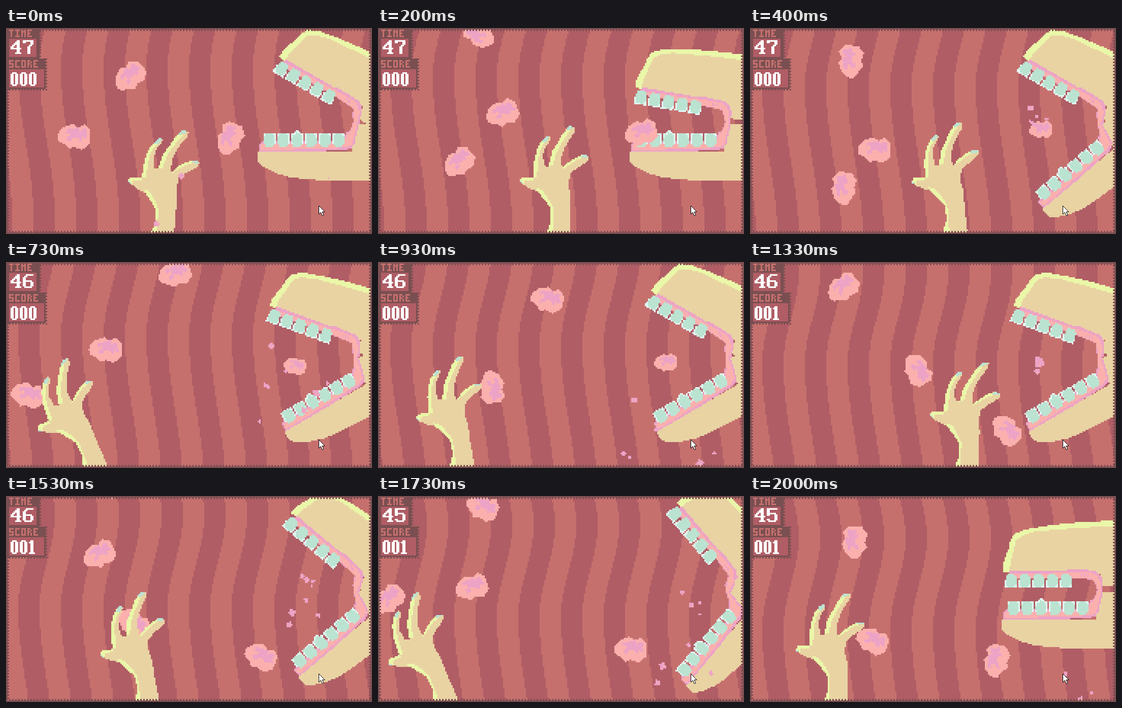
Write an HTML page with a canvas that moves like this. It is 720 px wide and 405 px high and loops after 2060 ms.

```html
<!DOCTYPE html>
<html lang="en">
<head>
<meta charset="utf-8">
<title>Feeding game</title>
<style>
html, body { margin: 0; width: 100%; height: 100%; overflow: hidden; background: #7a4f51; }
canvas { display: block; }
</style>
</head>
<body>
<canvas id="stage" width="720" height="405"></canvas>
<script>
const g = document.getElementById('stage').getContext('2d');
const W = 720, H = 405, PX = 3, LOOP = 2060, FPS = 15;
const LIGHT = '#c6706e', DARK = '#b05d65', BROWN = '#7a4f51', SKIN = '#e9d3a3', SHINE = '#eaf7a8',
  SALMON = '#fbb0ad', PINK = '#eda3c6', MINT = '#bbe3d2', WHITE = '#e2f9f3';

const points = s => s.split(' ').map(p => p.split(',').map(Number));
const snap = v => Math.round(v / PX) * PX;

function rect(x, y, w, h, color) {
  g.fillStyle = color;
  g.fillRect(x, y, w, h);
}

// Fills a polygon on the coarse pixel grid, without smoothing.
function poly(pts, color) {
  const ys = pts.map(p => p[1]);
  const end = Math.min(H, Math.max(...ys));
  for (let y = Math.max(0, Math.floor(Math.min(...ys) / PX) * PX); y < end; y += PX) {
    const c = y + PX / 2, xs = [];
    pts.forEach((a, k) => {
      const b = pts[(k + 1) % pts.length];
      if ((a[1] <= c) !== (b[1] <= c)) xs.push(a[0] + (c - a[1]) / (b[1] - a[1]) * (b[0] - a[0]));
    });
    xs.sort((a, b) => a - b);
    for (let k = 0; k + 1 < xs.length; k += 2) {
      const x = snap(xs[k]);
      rect(x, y, snap(xs[k + 1]) - x, PX, color);
    }
  }
}

// Rotates points about a pivot and puts the pivot at a new place.
function turn(pts, [cx, cy], deg, [px, py] = [cx, cy], size = 1) {
  const c = Math.cos(deg * Math.PI / 180) * size, s = Math.sin(deg * Math.PI / 180) * size;
  return pts.map(([x, y]) => [px + (x - cx) * c - (y - cy) * s, py + (x - cx) * s + (y - cy) * c]);
}

// Keys are [step, ...values]; gives null outside their range.
function track(keys, i, ease = u => u) {
  const k = keys.findIndex((a, n) => n && a[0] >= i);
  if (k < 0 || i < keys[0][0]) return null;
  const a = keys[k - 1], b = keys[k], u = ease((i - a[0]) / (b[0] - a[0]));
  return a.slice(1).map((v, n) => v + (b[n + 1] - v) * u);
}
const smooth = u => u * u * (3 - 2 * u);

const layer = (color, s) => ({ color, pts: points(s) });
const paint = (layers, put) => layers.forEach(l => poly(put(l.pts), l.color));

function background(i) {
  rect(0, 0, W, H, LIGHT);
  const bend = 75 + 6.17 * i;
  for (let y = 0; y < H; y += PX) {
    const d = y - bend;
    const shift = snap(15 * (1 - Math.cos(Math.PI * d / (d < 0 ? 180 : 300))));
    for (let x = shift - 60; x < W; x += 84) rect(x, y, 42, PX, DARK);
  }
}

// Meat
const MEAT = points('-33,-1 -30,-9 -21,-19 -2,-25 8,-18 20,-24 32,-12 31,14 16,25 0,20 -10,24 -17,16 -31,8');
let seed = 7;
const rnd = () => (seed = seed * 16807 % 2147483647) / 2147483647;
const SPOTS = Array.from({ length: 26 }, (_, k) => {
  const a = rnd() * 6.3, r = Math.sqrt(rnd()) * 19, w = 3 + rnd() * 5, h = 2 + rnd() * 4;
  const x = Math.cos(a) * r * 1.2, y = Math.sin(a) * r * .8;
  return { color: k % 4 === 3 ? SALMON : PINK, pts: [[x - w, y], [x, y - h], [x + w, y - h], [x + w, y + h], [x - w / 2, y + h]] };
});

const CHUNKS = [
  [[0, 244, 96, -45], [6, 245, 240, 0], [8, 245, 290, 5], [11, 42, 262, 10], [14, -90, 290, 30]],
  [[0, 134, 214, 0], [6, 185, 315, -90], [10, 215, 440, -140]],
  [[0, 441, 218, -70], [3.9, 540, 203, 0]],
  [[.5, 200, -35, -190], [6, 199, 66, -90], [11, 196, 173, 0], [14, 224, 246, 80], [20, 504, 331, 45], [26, 497, 302, 0], [30, 485, 324, -80]],
  [[7.5, 332, -35, -80], [11, 332, 24, -20], [14, 333, 74, 10], [20, 329, 212, 60], [22, 325, 265, 60], [26, 22, 204, -45], [29, -120, 200, -90]],
  [[15, 183, -35, -120], [20, 183, 51, -40], [26, 184, 180, -20], [30, 240, 285, 20]],
  [[22.5, 204, -35, 60], [26, 205, 22, 20], [30, 206, 91, -90]],
  [[29, 130, -38, 0], [30, 130, -20, 0]]
];
const MORSEL = [[4, 560, 203, 0], [6, 572, 200, -10], [11, 568, 205, 10], [14, 566, 198, -10], [19, 566, 198, 0]];

function meat(keys, i, size = 1) {
  const at = track(keys, i);
  if (!at) return;
  const [x, y, deg] = at;
  const put = pts => turn(pts, [0, 0], deg, [x, y], size);
  poly(put(MEAT), SALMON);
  paint(SPOTS, put);
}

// Crumbs: x, y, vx, vy, radius at step "zero"
const BURSTS = [
  { zero: 0, from: 0, to: 5, bits: [[345, 291, -30, 650, 5], [296, 385, -60, 700, 5], [635, 295, 40, 600, 2]] },
  { zero: 6, from: 4, to: 18, bits: [[552, 157, -90, -293, 5], [557, 188, -140, -153, 4], [551, 184, -105, -133, 3],
    [572, 196, 115, -133, 6], [584, 179, 145, -138, 3], [565, 174, -198, 103, 3], [572, 200, 45, -40, 5], [560, 190, -28, -244, 3]] },
  { zero: 20, from: 19, to: 30, bits: [[566, 201, 82, -410, 4], [566, 191, 127, -320, 5], [576, 200, 142, -354, 3],
    [570, 195, 158, -285, 2], [570, 195, 103, -135, 4], [566, 200, -15, -45, 6], [565, 215, -38, 0, 5], [573, 195, 205, 5, 4]] }
];

function crumbs(i) {
  for (const b of BURSTS) {
    if (i < b.from || i > b.to) continue;
    const t = (i - b.zero) / FPS;
    b.bits.forEach(([x, y, vx, vy, r], k) => {
      const at = [x + vx * t, y + vy * t + 950 * t * t];
      const square = [[-r, -r], [r, -r], [r, r], [-r, r]];
      poly(turn(square, [0, 0], 20 + k * 37 + i * 12, at), PINK);
      if (r > 4) rect(snap(at[0]), snap(at[1]), PX, PX, SALMON);
    });
  }
}

// Jaws, in their closed pose
const UP = [690, 177], LOW = [691, 190];
const UPPER = [
  layer(SHINE, '498,150 498,135 502,122 510,100 512,88 520,75 540,66 580,59 630,53 714,48 900,40 900,177 690,177 690,150'),
  layer(SKIN, '510,152 512,132 520,100 523,88 535,78 560,70 640,63 714,59 900,50 900,177 690,177 690,152')
];
const LOWER = [
  layer(SKIN, '495,242 495,262 505,272 530,285 560,294 600,298 640,300 900,300 900,190 691,190 680,242')
];
const UPPER_GUM = [
  layer(PINK, '509,154 512,147 620,147 630,144 676,146 688,153 692,172 684,182 674,164 632,162 509,162'),
  layer(SALMON, '520,154 640,150 672,151 684,158 687,172 683,176 674,163 632,161 520,161')
];
const LOWER_GUM = [
  layer(PINK, '498,228 505,222 664,222 668,207 678,200 686,210 681,236 668,240 590,243 498,243'),
  layer(SALMON, '500,229 664,226 670,210 679,205 680,230 668,235 590,238 502,240')
];
const TOOTH = points('-7,-13 7,-13 11,-6 11,6 7,12 -7,12 -10,5 -10,-6');
const JAW_KEYS = [[0, 30, 0], [3, 10, 0], [6, 30, -40], [11, 20, -30], [14, 30, -30], [17, 20, -30],
  [19, 10, -20], [20, 20, -30], [26, 50, -50], [30, 0, 0]];

function jaws(i) {
  const [up, low] = track(JAW_KEYS, i).map(a => Math.round(a / 10) * 10);
  const top = pts => turn(pts, UP, up), bottom = pts => turn(pts, LOW, low);
  const tooth = (x, y, put, a, b) => {
    const move = pts => put(pts.map(p => [p[0] + x, p[1] + y]));
    poly(move([[-12, a], [12, a], [12, b], [-12, b]]), WHITE);
    poly(move(TOOTH), MINT);
    return move;
  };
  const throat = (inner, outer, color) => poly([
    ...top([[678 + inner, 170]]), [683 + inner, 186], ...bottom([[672 + inner, 212], [684 - outer, 234]]),
    [694 - outer, 190], ...top([[692 - outer, 160]])], color);

  paint(UPPER, top);
  paint(LOWER, bottom);
  throat(0, 0, PINK);
  paint(UPPER_GUM, top);
  paint(LOWER_GUM, bottom);
  throat(1, 4, SALMON);
  for (let x = 652; x < 664; x += 5) poly(top([[x, 154], [x + 3, 154], [x + 3, 158], [x, 158]]), PINK);
  for (let k = 0; k < 5; k++) tooth(513 + 27 * k, 167, top, -1, 14);
  for (let k = 0; k < 6; k++) {
    const move = tooth(518 + 27.2 * k, 221, bottom, -14, 6);
    if (k === 2) {
      poly(move(points('-9,-12 -3,-19 3,-19 9,-12')), WHITE);
      poly(move(points('-5,-11 0,-17 7,-11')), MINT);
    }
  }
}

// Hand, in its upright pose
const WRIST = [404.5, 400];
const PALM = [
  layer(SKIN, '385,450 380,400 387,375 383,350 370,335 355,320 340,316 325,309 318,302 322,295 345,293 343,262 346,240 350,228 358,215 366,209 371,213 368,222 362,232 359,250 364,269 372,269 376,240 385,222 395,200 405,187 418,186 417,197 408,212 400,230 396,245 397,262 399,271 410,258 425,246 435,241 450,242 449,250 440,258 425,270 416,280 414,300 420,320 422,350 425,375 428,400 432,450')
];
const EDGES = [
  layer(SHINE, '344,293 343,262 346,240 350,228 358,215 362,222 355,232 351,250 351,293'),
  layer(SHINE, '372,269 376,240 385,222 395,200 403,190 407,196 394,220 385,240 380,267'),
  layer(SHINE, '399,271 410,258 425,246 435,241 437,246 425,252 412,263 402,271'),
  layer(SHINE, '318,302 322,295 345,293 345,298 328,301 326,308'),
  layer(SHINE, '385,450 380,400 387,375 383,350 370,335 355,320 352,313 366,318 378,333 388,348 390,372 392,400 397,450')
];
const NAILS = [
  layer(MINT, '356,222 359,214 366,209 369,213 363,221'),
  layer(MINT, '399,196 405,187 417,186 408,193'),
  layer(MINT, '433,245 436,240 449,241 446,245'),
  layer(MINT, '318,302 323,304 325,309 320,306')
];
const HAND_KEYS = [[0, 307, 411, 10.6], [6, 404.5, 400, 0], [11, 173, 397, -17], [14, 166, 400, -3],
  [20, 425, 409, 8.4], [26, 131, 397, -17], [30, 170, 405, 3.8]];

function hand(i) {
  const [x, y, deg] = track(HAND_KEYS, i, smooth);
  for (const part of [PALM, EDGES, NAILS]) paint(part, pts => turn(pts, WRIST, deg, [x, y]));
}

// Pixel lettering: each stroke is x1 y1 x2 y2
const GLYPHS = {
  T: '0020 1014', I: '0020 1014 0424', M: '0004 2024 0121', E: '0020 0004 0212 0424',
  S: '0020 0002 0222 2224 0424', C: '0020 0004 0424', O: '0020 0004 0424 2024', R: '0004 0010 2121 0212 2324',
  0: '1020 0107 3137 1828', 1: '1018 0111 0828', 4: '4048 4004 0555 3858',
  5: '0050 0004 0343 5457 1848 0707', 6: '2050 1111 0207 1848 5557 1444', 7: '0050 0001 5052 5234 3438'
};

function text(str, x, y, step, pen, color) {
  [...str].forEach((ch, n) => GLYPHS[ch].split(' ').forEach(stroke => {
    const [x1, y1, x2, y2] = [...stroke].map(Number);
    const len = Math.max(Math.abs(x2 - x1), Math.abs(y2 - y1));
    for (let k = 0; k <= len; k++) {
      const u = len && k / len;
      rect(x + n * step + PX * Math.round(x1 + (x2 - x1) * u), y + PX * Math.round(y1 + (y2 - y1) * u), PX * pen, PX, color);
    }
  }));
}

function border() {
  rect(0, 0, W, PX, BROWN);
  rect(0, H - PX, W, PX, BROWN);
  rect(0, 0, PX, H, BROWN);
  rect(W - PX, 0, PX, H, BROWN);
  for (let x = 0; x < W; x += 6) {
    rect(x, PX, PX, PX, BROWN);
    rect(x, H - 2 * PX, PX, PX, BROWN);
  }
  for (let y = 0; y < H; y += 6) {
    rect(PX, y, PX, PX, BROWN);
    rect(W - 2 * PX, y, PX, PX, BROWN);
  }
}

function hud(i) {
  rect(0, 0, 66, 60, BROWN);
  rect(0, 60, 78, 60, BROWN);
  for (let y = 0; y < 60; y += 6) {
    rect(66, y, PX, PX, BROWN);
    rect(78, y + 60, PX, PX, BROWN);
  }
  for (let x = 0; x < 81; x += 6) rect(x, 120, PX, PX, BROWN);
  rect(6, 21, 54, 36, DARK);
  rect(6, 81, 69, 36, DARK);
  text('TIME', 6, 3, 12, 1, LIGHT);
  text('SCORE', 6, 63, 12, 1, LIGHT);
  text(i < 9 ? '47' : i < 24 ? '46' : '45', 9, 24, 24, 2, '#fff');
  text(i < 19 ? '000' : '001', 9, 87, 18, 2, '#fff');
}

const ARROW = new Path2D('M615.5 349.5V366l3.8-3.6 2.9 6.6 2.8-1.2-2.8-6.3h4.9z');
function cursor() {
  g.fillStyle = '#fff';
  g.fill(ARROW);
  g.strokeStyle = '#000';
  g.lineWidth = 1;
  g.stroke(ARROW);
}

function draw(now) {
  const tick = Math.floor(now % LOOP / 10);
  const i = Math.ceil((tick + 1) * 3 / 20) - 1;
  background(i);
  jaws(i);
  CHUNKS.forEach(keys => meat(keys, i));
  meat(MORSEL, i, .7);
  hand(i);
  crumbs(i);
  border();
  hud(i);
  cursor();
  requestAnimationFrame(draw);
}
draw(0);
</script>
</body>
</html>
```
